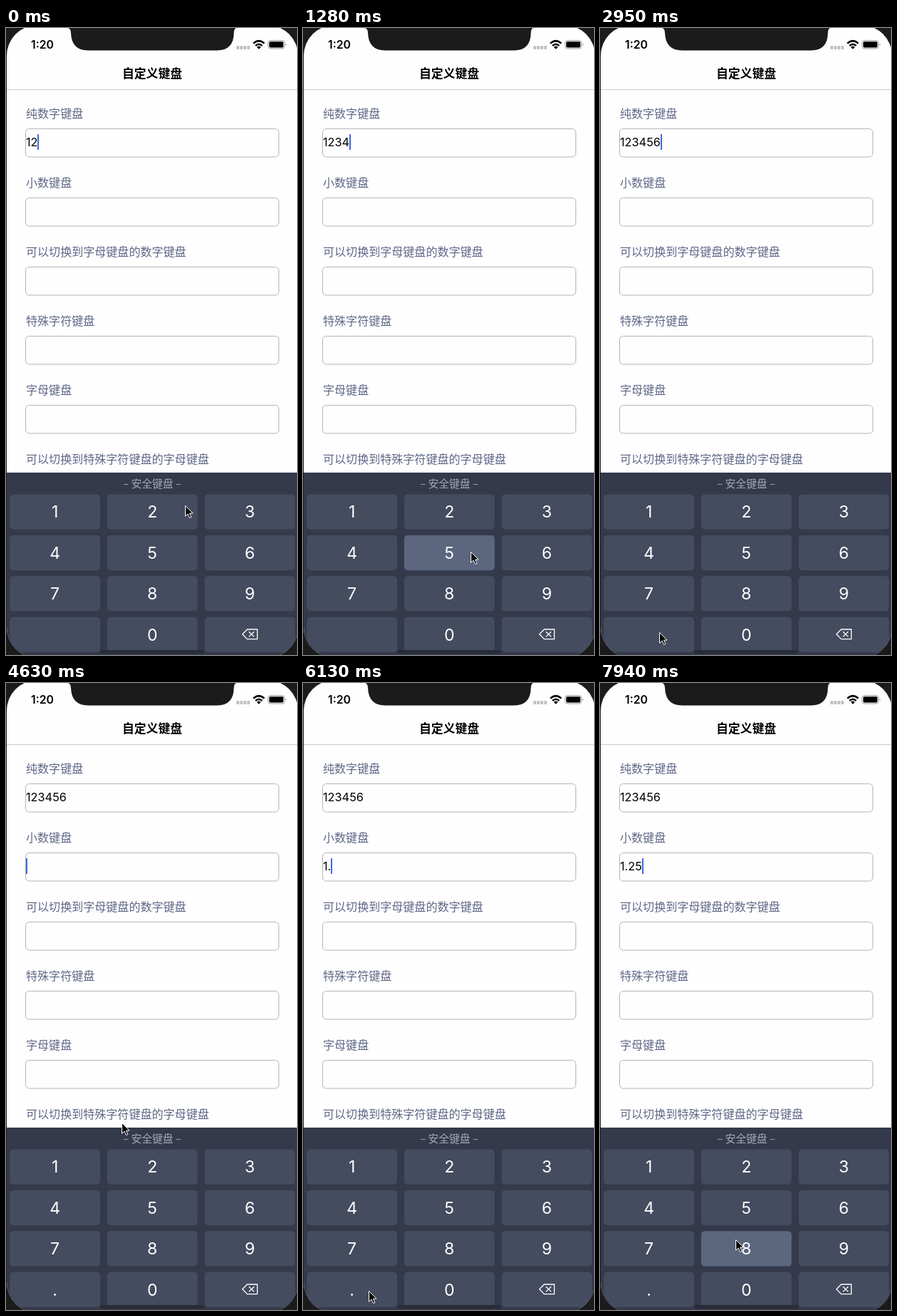
These frames come from a looping animation (408x880 px, 8 s). An HTML page:

```html
<!DOCTYPE html>
<html lang="zh-CN">
<head>
<meta charset="utf-8">
<title>自定义键盘</title>
<style>
  html, body { margin: 0; width: 100%; height: 100%; overflow: hidden; background: #1b1b1c; }
  svg { display: block; width: 100%; height: 100%; }
  text { font-family: Inter, "Noto Sans CJK SC", "Noto Sans CJK", sans-serif; }
  .cjk { font-family: "Noto Sans CJK SC", "Noto Sans CJK", sans-serif; }
  .label { font-size: 16.06px; fill: #5f6787; }
  .title { font-size: 16.8px; font-weight: 600; text-anchor: middle; fill: #000; }
  .clock { font-size: 15.8px; font-weight: 600; fill: #000; }
  .box { fill: #fefefe; stroke: #b4b4b6; }
  .value { font-size: 16.3px; fill: #000; }
  .hint { font-size: 14.8px; text-anchor: middle; fill: #a1a6b4; }
  .key { fill: #454c5f; }
  .key.down { fill: #5c667f; }
  .digit { font-size: 23px; text-anchor: middle; fill: #fff; }
</style>
</head>
<body>
<svg id="stage" viewBox="0 0 408 880">
  <defs>
    <clipPath id="screen"><rect x="1" y="-4" width="408.5" height="888" rx="43"/></clipPath>
  </defs>
  <g clip-path="url(#screen)">
    <rect width="408" height="880" fill="#fefefe"/>
    <path d="M0 86.5H408" stroke="#cbcbcd"/>
    <text class="clock" x="35" y="29">1:20</text>
    <text class="title cjk" x="205" y="70">自定义键盘</text>
    <g fill="#c2c2c4">
      <rect x="323" y="25" width="4" height="5" rx="1"/>
      <rect x="328" y="25" width="4" height="5" rx="1"/>
      <rect x="333" y="25" width="4" height="5" rx="1"/>
      <rect x="338" y="25" width="4" height="5" rx="1"/>
    </g>
    <g fill="none" stroke="#000" stroke-width="2.5">
      <path d="M346.8 21.6Q354.5 14.6 362.2 21.6"/>
      <path d="M349.8 24.9Q354.5 20.6 359.2 24.9"/>
    </g>
    <path d="M351.6 26.8Q354.5 24.3 357.4 26.8L354.5 29.8Z"/>
    <rect x="367.5" y="17.5" width="23" height="11.5" rx="3.5" fill="none" stroke="#9a9a9a"/>
    <rect x="369" y="19" width="20" height="8.5" rx="2"/>
    <path d="M392 21.2Q394 23.2 392 25.3Z" fill="#9a9a9a"/>
    <g id="form"></g>
    <rect id="caret" width="2" height="22" fill="#4169df"/>
    <rect y="624" width="408" height="256" fill="#343a4c"/>
    <text class="hint cjk" x="205" y="644.5">– 安全键盘 –</text>
    <g id="pad"></g>
    <g fill="none" stroke="#fff" stroke-width="1.3" stroke-linejoin="round">
      <path d="M338.2 844H352.4V857.6H338.2L331.5 850.8Z"/>
      <path d="M340.6 847.2L348 854.4M348 847.2L340.6 854.4"/>
    </g>
    <rect x="132" y="873" width="146" height="5.5" rx="2.7" fill="#292c38"/>
  </g>
  <path d="M87 0Q91 1 91 7Q92 31.5 115 31.5H296Q319 31.5 319.5 7Q319.5 1 323 0Z" fill="#1b1b1c"/>
  <path id="pointer" d="M.5 .5V15.2L4 12L6.5 17.6L8.9 16.5L6.4 11.1H11Z" fill="#000" stroke="#fff" stroke-linejoin="round"/>
</svg>
<script>
const LOOP = 8000, FOCUS = 4330;
const $ = id => document.getElementById(id);

function add(parent, tag, attrs, content = '') {
  const node = document.createElementNS('http://www.w3.org/2000/svg', tag);
  for (const name in attrs) node.setAttribute(name, attrs[name]);
  node.textContent = content;
  parent.append(node);
  return node;
}

const labels = ['纯数字键盘', '小数键盘', '可以切换到字母键盘的数字键盘',
  '特殊字符键盘', '字母键盘', '可以切换到特殊字符键盘的字母键盘'];
const values = labels.map((label, i) => {
  const y = i * 97;
  add($('form'), 'text', { class: 'label cjk', x: 28, y: y + 126.3 }, label);
  add($('form'), 'rect', { class: 'box', x: 27.5, y: y + 141.5, width: 355, height: 39.5, rx: 5 });
  return add($('form'), 'text', { class: 'value', x: 28, y: y + 166 });
});

const keys = {}, digits = {};
[...'123456789.0<'].forEach((name, i) => {
  const col = i % 3, row = Math.floor(i / 3);
  const x = 5.3 + col * 136.6, y = 654.5 + row * 57.4;
  keys[name] = add($('pad'), 'rect', { class: 'key', x, y, width: 126.7, height: 49.3, rx: 5 });
  if (name !== '<')
    digits[name] = add($('pad'), 'text', { class: 'digit', x: x + 63.3, y: y + 32.8 }, name);
});

// key, touch down, touch up, field (none when the input is rejected)
const presses = [
  ['3', 340, 460, 0], ['4', 960, 1060, 0], ['5', 1250, 1360, 0], ['6', 1600, 1790, 0],
  ['.', 5330, 5430], ['1', 5650, 5750, 1], ['.', 5970, 6080, 1],
  ['2', 6640, 6760, 1], ['5', 7490, 7610, 1], ['8', 7860, 8010, 1]
];

// time, x, y of the pointer tip
const path = [
  [0, 251, 670], [60, 251, 670], [320, 355, 688], [430, 355, 688], [800, 115, 727],
  [1030, 115, 727], [1240, 235, 735], [1340, 235, 735], [1580, 357, 732], [1900, 357, 732],
  [2590, 104, 840], [2900, 83, 848], [3310, 83, 848], [3670, 191, 326], [4050, 166, 262],
  [4430, 166, 262], [4630, 162, 617], [4740, 162, 617], [5240, 86, 830], [5400, 88, 834],
  [5640, 98, 686], [5740, 98, 686], [5960, 92, 853], [6190, 92, 853], [6470, 175, 706],
  [6620, 186, 690], [6900, 188, 690], [7360, 190, 731], [7600, 190, 731], [7830, 190, 781],
  [LOOP, 190, 781]
];

const clamp = v => Math.min(1, Math.max(0, v));
const smooth = u => u * u * (3 - 2 * u);

function pointerAt(t) {
  const i = path.findIndex(p => p[0] > t);
  const [t0, x0, y0] = path[i - 1], [t1, x1, y1] = path[i];
  const u = smooth((t - t0) / (t1 - t0));
  return [x0 + (x1 - x0) * u, y0 + (y1 - y0) * u];
}

function render(t) {
  const field = t < FOCUS ? 0 : 1;
  const texts = ['12', ''];
  let lastEdit = field ? FOCUS : 0;
  for (const name in keys) keys[name].setAttribute('class', 'key');
  for (const [name, down, up, target] of presses) {
    if (t >= down && t < up) keys[name].setAttribute('class', 'key down');
    if (t >= up && target !== undefined) {
      texts[target] += name;
      lastEdit = Math.max(lastEdit, up);
    }
  }
  texts.forEach((text, i) => {
    if (values[i].textContent !== text) values[i].textContent = text;
  });
  digits['.'].setAttribute('visibility', field ? 'visible' : 'hidden');

  const width = texts[field] ? values[field].getComputedTextLength() : 0;
  const phase = (t - lastEdit) % 1000;
  $('caret').setAttribute('x', Math.round(28 + width - .3));
  $('caret').setAttribute('y', 149 + field * 97);
  $('caret').setAttribute('opacity', clamp((660 - phase) / 100) + clamp((phase - 940) / 60));
  $('pointer').setAttribute('transform', `translate(${pointerAt(t)})`);
}

let start;
function tick(now) {
  start ??= now;
  render((now - start) % LOOP);
  requestAnimationFrame(tick);
}
render(0);
requestAnimationFrame(tick);
</script>
</body>
</html>
```
